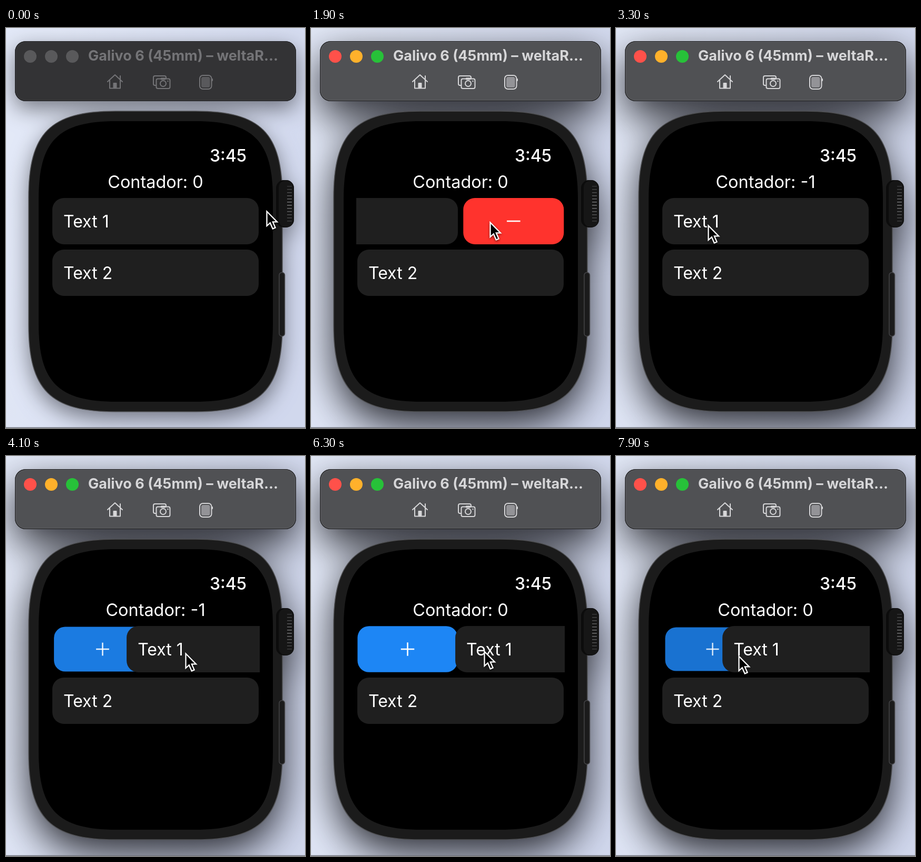
Animation, 568 px wide and 760 px high, one loop 8 s. Source, as an HTML page with a canvas:

```html
<!DOCTYPE html>
<html lang="es">
<head>
<meta charset="utf-8">
<title>Contador</title>
<style>
  html, body { margin: 0; width: 100%; height: 100%; overflow: hidden; background: #d5dcf0; }
  canvas { display: block; width: 568px; height: 760px; }
</style>
</head>
<body>
<canvas id="stage" width="568" height="760"></canvas>
<script>
const ctx = document.getElementById('stage').getContext('2d');
const LOOP = 8000, STEP = 100, OPEN = 201;
const ROW = { x: 88, w: 392, h: 88 };

// Smooth 0-to-1 progress between two times
function glide(t, from, to) {
  const p = Math.min(1, Math.max(0, (t - from) / (to - from)));
  return p * p * (3 - 2 * p);
}

// Swipe left and tap, swipe right and tap, then swipe right twice
function rowOffset(t) {
  const left = glide(t, 700, 1500) - glide(t, 2400, 2700);
  const right = glide(t, 3500, 4440) - glide(t, 4850, 5200)
    + glide(t, 5800, 6400) - glide(t, 6900, 7400) + glide(t, 7480, 8250);
  return OPEN * (right - left);
}

function pointerX(t) {
  return 495 - 24 * glide(t, 0, 500)
    - 216 * glide(t, 700, 1400) + 85 * glide(t, 1500, 1900)
    - 165 * glide(t, 2800, 3300) + 166 * glide(t, 3400, 4100)
    - 160 * glide(t, 4400, 5000) - 81 * glide(t, 5100, 5700)
    + 229 * glide(t, 5800, 6300) - 210 * glide(t, 6700, 7300)
    + 114 * glide(t, 7480, 7900);
}

function pointerY(t) {
  return 347 + 10 * glide(t, 0, 500) + 11 * glide(t, 700, 1400)
    + 6 * glide(t, 2800, 3300) + 7 * glide(t, 4400, 5000)
    - 11 * glide(t, 5100, 6300) + 9 * glide(t, 6700, 7300);
}

function paint(fill, stroke, width = 1) {
  if (fill) { ctx.fillStyle = fill; ctx.fill(); }
  if (stroke) { ctx.strokeStyle = stroke; ctx.lineWidth = width; ctx.stroke(); }
}

function box(x, y, w, h, r, fill, stroke, width) {
  ctx.beginPath();
  ctx.roundRect(x, y, w, h, r);
  paint(fill, stroke, width);
}

function disc(x, y, r, fill, stroke, width) {
  ctx.beginPath();
  ctx.arc(x, y, r, 0, Math.PI * 2);
  paint(fill, stroke, width);
}

function polyline(points, fill, stroke, width, close) {
  ctx.beginPath();
  points.forEach(([x, y]) => ctx.lineTo(x, y));
  if (close) ctx.closePath();
  paint(fill, stroke, width);
}

function label(text, x, y, size, color, weight = 400, align = 'left') {
  ctx.font = `${weight} ${size}px Inter, sans-serif`;
  ctx.textAlign = align;
  ctx.fillStyle = color;
  ctx.fillText(text, x, y);
}

// Rounded case with long, soft corners
function casePath(l, t, r, b, reach) {
  const path = new Path2D(), c = reach * 0.25;
  path.moveTo(l + reach, t);
  path.lineTo(r - reach, t);
  path.bezierCurveTo(r - c, t, r, t + c, r, t + reach);
  path.lineTo(r, b - reach);
  path.bezierCurveTo(r, b - c, r - c, b, r - reach, b);
  path.lineTo(l + reach, b);
  path.bezierCurveTo(l + c, b, l, b - c, l, b - reach);
  path.lineTo(l, t + reach);
  path.bezierCurveTo(l, t + c, l + c, t, l + reach, t);
  path.closePath();
  return path;
}

const body = casePath(43, 158, 525, 729, 165);
const screen = casePath(62, 177, 507, 710, 148);
const silhouette = new Path2D(body);
silhouette.roundRect(17, 25, 534, 114, 20);
silhouette.roundRect(513, 289, 34, 90, 15);

function drawBackdrop(active) {
  const sky = ctx.createLinearGradient(0, 300, 568, 460);
  sky.addColorStop(0, '#e3e9f7');
  sky.addColorStop(1, '#d1d8ed');
  ctx.fillStyle = sky;
  ctx.fillRect(0, 0, 568, 760);
  ctx.save();
  ctx.shadowColor = active ? 'rgba(0,0,4,.8)' : 'rgba(0,0,4,.48)';
  ctx.shadowBlur = active ? 74 : 42;
  ctx.shadowOffsetY = active ? 28 : 14;
  ctx.fillStyle = '#222';
  ctx.fill(silhouette);
  ctx.restore();
  ctx.fillStyle = '#71747d';
  ctx.fillRect(0, 758.6, 568, 1.4);
}

function drawToolbar(active) {
  const ink = active ? '#d6d6d8' : '#747477';
  const panel = active ? '#505154' : '#333335';
  box(17.5, 25.5, 533, 113, 20, panel, '#1b1b1d');
  box(18.7, 26.7, 530.6, 110.6, 19, null, active ? '#5d5e61' : '#3c3c3f');
  ['#ff514a', '#ffb12b', '#27c139'].forEach((color, i) =>
    disc(46 + i * 40, 54, 12, active ? color : '#59595b'));
  label('Galivo 6 (45mm) – weltaR...', 156, 62, 27, ink, 700);

  // Home
  ctx.lineJoin = ctx.lineCap = 'round';
  polyline([[193, 102], [207, 89], [221, 102]], null, ink, 2);
  polyline([[197, 99], [197, 114.5], [217, 114.5], [217, 91]], null, ink, 2);
  box(203.5, 104, 7, 10, 1, ink);

  // Cameras
  box(280, 91, 24, 18, 3, null, ink, 2);
  box(285.5, 96.5, 26, 18.5, 3, panel, ink, 2);
  box(293.5, 94.5, 10, 4, 2, ink);
  disc(298.5, 105.5, 5.5, panel, ink, 2);
  disc(307.5, 101, 1.2, ink);

  // Watch
  box(368, 90, 22.5, 26, 6, null, ink, 2);
  box(371, 93, 16.5, 20, 3.5, active ? '#939397' : '#59595c');
  box(390.5, 96, 2.5, 5, 1, ink);
}

function drawWatch() {
  ctx.fillStyle = '#1b1b1b';
  ctx.fill(body);
  ctx.strokeStyle = '#505154';
  ctx.lineWidth = 1.5;
  ctx.stroke(body);
  ctx.fillStyle = '#000';
  ctx.fill(screen);

  box(513, 289, 34, 90, 15, '#0c0c0c');
  box(518, 290, 28, 88, 13, '#161616');
  for (let y = 300; y <= 370; y += 6) {
    const light = 0.85 - Math.abs(y - 334) / 60;
    ctx.fillStyle = `rgba(140,140,142,${light})`;
    ctx.fillRect(534, y, 9, 1.5);
  }
  box(519, 464.5, 10.5, 121, 5, '#1b1b1b', '#454547', 1.5);
}

function drawAction(offset) {
  const isAdd = offset > 0;
  const rest = Math.pow(1 - Math.min(1, Math.abs(offset) / OPEN), 1.5);
  const scale = 1 - 0.2 * rest;
  ctx.save();
  ctx.globalAlpha = 1 - 0.55 * rest;
  ctx.translate(isAdd ? 183.5 : 384.8, 367);
  ctx.scale(scale, scale);
  box(-95.5, -44, 191, 88, 22, isAdd ? '#1e88f8' : '#ff332d');
  ctx.fillStyle = '#fff';
  ctx.fillRect(-12.8, -1.3, 25.6, 2.6);
  if (isAdd) ctx.fillRect(-1.3, -12.8, 2.6, 25.6);
  ctx.restore();
}

function drawRow(text, y, offset = 0) {
  ctx.save();
  ctx.beginPath();
  ctx.rect(86, y - 1, 396, ROW.h + 2);
  ctx.clip();
  if (offset) drawAction(offset);
  box(ROW.x + offset, y, ROW.w, ROW.h, 22, '#1f1f1f');
  label(text, 109 + offset, y + 56, 32, '#fff');
  ctx.restore();
}

function drawPointer(x, y) {
  ctx.save();
  ctx.translate(x, y);
  ctx.shadowColor = 'rgba(0,0,0,.4)';
  ctx.shadowBlur = 4;
  ctx.shadowOffsetY = 2;
  ctx.lineJoin = 'miter';
  polyline([[0.5, 1.5], [0.5, 29], [6.8, 23.2], [11.7, 34.5], [16.6, 32.3],
    [11.8, 21.4], [20, 21.4]], '#000', '#fff', 2.3, true);
  ctx.restore();
}

function draw(t) {
  const active = t >= 700;
  const count = t >= 2500 && t < 5000 ? -1 : 0;
  drawBackdrop(active);
  drawToolbar(active);
  drawWatch();
  label('3:45', 387, 254, 32, '#fff', 500);
  label('Contador: ' + count, 284, 304, 32.4, '#fff', 400, 'center');
  drawRow('Text 1', 323, rowOffset(t));
  drawRow('Text 2', 421);
  drawPointer(pointerX(t), pointerY(t));
}

function tick() {
  const t = performance.now() % LOOP;
  draw(Math.floor(t / STEP) * STEP);
  requestAnimationFrame(tick);
}
tick();
</script>
</body>
</html>
```
